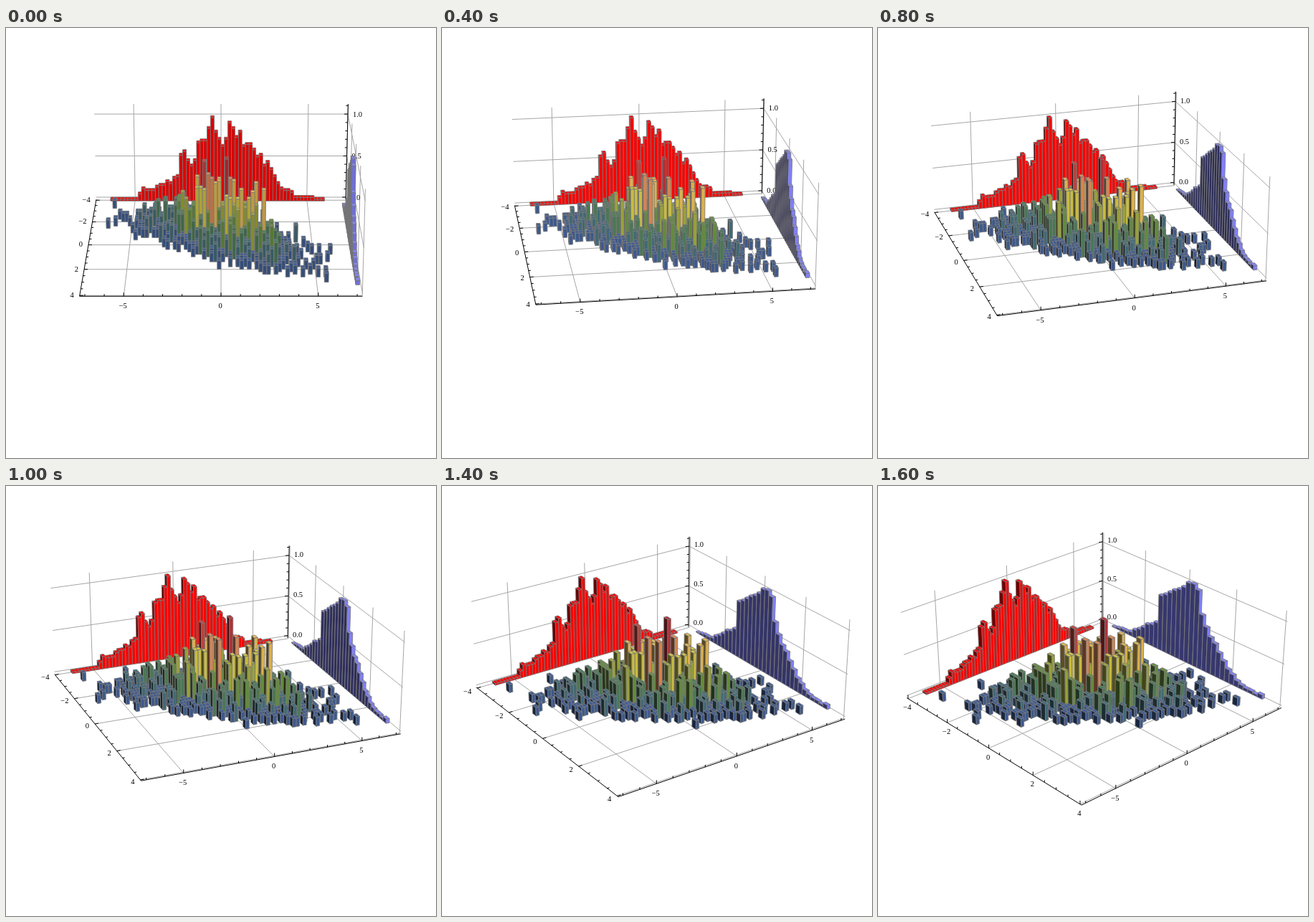
Recreate the animation shown at these times as an HTML page with a canvas. Size 600 by 600 pixels, loop 1700 ms.

```html
<!DOCTYPE html>
<html lang="en">
<head>
<meta charset="utf-8">
<title>Rotating 3D histogram</title>
<style>
html, body { margin: 0; width: 100%; height: 100%; overflow: hidden; background: #fff; }
canvas { display: block; width: 600px; height: 600px; }
</style>
</head>
<body>
<canvas id="c" width="600" height="600"></canvas>
<script>
const ctx = document.getElementById('c').getContext('2d');
const STEPS = 17, STEP_MS = 100, BIN = 0.2;
const XM = 7.27, YM = 4.06, Z0 = -0.029, Z1 = 1.119;
const RED = [255, 0, 0], BLUE = [128, 128, 255];

// Outlines of the two marginals as [position, height]
const xShape = [[-6.4, 0.015], [-4.9, 0.025], [-4.6, 0.13], [-3.9, 0.13], [-2.5, 0.28], [-2.3, 0.6],
  [-1.7, 0.46], [-0.9, 0.82], [-0.5, 1], [0.1, 0.72], [0.5, 0.85], [0.9, 0.85], [1.7, 0.63],
  [2.9, 0.38], [3.3, 0.2], [4.3, 0.06], [6.2, 0.012]];
const yShape = [[-3.3, 0.015], [-2.5, 0.05], [-1.3, 0.33], [-1.1, 0.71], [0.3, 1], [0.5, 0.95],
  [0.7, 0.7], [1.1, 0.46], [1.9, 0.16], [2.5, 0.04], [3.3, 0.012]];

// Height colours of the joint histogram, low to high
const ramp = [[60, 86, 146], [66, 108, 112], [80, 130, 62], [155, 162, 58], [222, 200, 72], [217, 140, 85], [178, 48, 54]];

function rampColor(h) {
  const p = Math.min(Math.max((h - 0.08) / 0.85, 0), 1) * (ramp.length - 1);
  const i = Math.min(Math.floor(p), ramp.length - 2);
  return ramp[i].map((a, j) => a + (ramp[i + 1][j] - a) * (p - i));
}

let seed = 20117;
function rand() {
  seed = (seed + 0x6D2B79F5) | 0;
  let r = Math.imul(seed ^ (seed >>> 15), 1 | seed);
  r = (r + Math.imul(r ^ (r >>> 7), 61 | r)) ^ r;
  return ((r ^ (r >>> 14)) >>> 0) / 4294967296;
}
const gauss = () => Math.sqrt(-2 * Math.log(1 - rand())) * Math.cos(2 * Math.PI * rand());

function heightAt(shape, p) {
  const i = Math.min(Math.max(shape.findIndex(s => s[0] >= p), 1), shape.length - 1);
  const [a, ha] = shape[i - 1], [b, hb] = shape[i];
  return ha + (hb - ha) * Math.min(Math.max((p - a) / (b - a), 0), 1);
}

// Whole counts per bin: the outline with some noise, peaking at max
function countBins(shape, from, to, max, noise) {
  const bins = [];
  for (let i = Math.round(from / BIN); i < Math.round(to / BIN); i++) {
    const mean = max * heightAt(shape, (i + 0.5) * BIN) * (1 + noise * (2 * rand() - 1));
    const n = Math.min(max, Math.round(mean + rand() - 0.5));
    if (n > 0) bins.push({ i, n, h: n / max });
  }
  return bins;
}

const xBins = countBins(xShape, -6.4, 6.2, 47, 0.11);
const yBins = countBins(yShape, -3.4, 3.4, 80, 0.04);

// Correlated cloud: y follows x, one unit of height per point
function jointBars() {
  const cells = new Map();
  const add = (i, j, h, max) => {
    const key = i + ',' + j, old = cells.get(key);
    cells.set(key, { i, j, h: Math.min((old ? old.h : 0) + h, max) });
  };
  for (const { i, n } of xBins) {
    for (let k = 0; k < n; k++) {
      const y = 0.05 + 0.37 * (i + 0.5) * BIN + 0.66 * gauss();
      add(i, Math.floor(Math.min(Math.max(y, -3.1), 2.7) / BIN), 0.1, 0.7);
    }
  }
  // Central peaks and the lone outlier
  [[1, 1, 1], [-5, -2, 0.9], [-3, 2, 0.8], [-4, 0, 0.8], [2, 2, 0.8], [27, 15, 0.1]]
    .forEach(([i, j, h]) => add(i, j, h, h));
  return [...cells.values()].map(({ i, j, h }) => ({ x: i * BIN, y: j * BIN, h, color: rampColor(h) }));
}

const redBars = xBins.map(({ i, h }) => ({ x: i * BIN, y: -3.9, h, color: RED }));
const blueBars = yBins.map(({ i, h }) => ({ x: 7, y: i * BIN, h, color: BLUE }));
const cloud = jointBars();

let cam;
function setCamera(k) {
  const t = 1.02 * k / (STEPS - 1);
  const left = 7.6 * Math.sin(t), front = 13.8 * Math.cos(t), up = 5.38;
  const r = Math.hypot(left, front), d = Math.hypot(r, up);
  cam = { x: -left * XM, ct: front / r, st: left / r, cp: r / d, sp: up / d, d };
}

function project(x, y, z) {
  const X = x / XM, Y = y / YM, Z = 0.8 * (z - Z0) / (Z1 - Z0);
  const u = X * cam.ct + Y * cam.st, v = Y * cam.ct - X * cam.st;
  const s = 185 / (1 - (v * cam.cp + Z * cam.sp) / cam.d);
  return [300 + s * u, 302.6 + s * (v * cam.sp - Z * cam.cp)];
}

function trace(pts) {
  ctx.beginPath();
  pts.forEach(p => ctx.lineTo(p[0], p[1]));
}

function line(a, b) {
  trace([a, b]);
  ctx.stroke();
}

function face(pts, color, light) {
  trace(pts.map(p => project(...p)));
  ctx.closePath();
  ctx.fillStyle = `rgb(${color.map(c => Math.min(255, Math.round(c * light)))})`;
  ctx.fill();
  ctx.stroke();
}

function drawBars(bars, light) {
  ctx.strokeStyle = '#7a7a7a';
  ctx.lineWidth = 0.85;
  const mid = b => Math.abs(b.x + BIN / 2 - cam.x);
  [...bars].sort((a, b) => a.y - b.y || mid(b) - mid(a)).forEach(({ x, y, h, color }) => {
    const x1 = x + BIN, y1 = y + BIN;
    const sx = cam.x < x ? x : cam.x > x1 ? x1 : null;
    if (sx !== null) face([[sx, y, 0], [sx, y1, 0], [sx, y1, h], [sx, y, h]], color, light.side);
    face([[x, y1, 0], [x1, y1, 0], [x1, y1, h], [x, y1, h]], color, light.front);
    face([[x, y, h], [x1, y, h], [x1, y1, h], [x, y1, h]], color, light.top);
  });
}

function drawGrid() {
  const seg = (a, b) => line(project(...a), project(...b));
  ctx.strokeStyle = '#a6a6a6';
  ctx.lineWidth = 1;
  for (const x of [-5, 0, 5]) {
    seg([x, -YM, Z0], [x, -YM, Z1]);
    seg([x, -YM, Z0], [x, YM, Z0]);
  }
  for (const y of [-4, -2, 0, 2, 4]) {
    seg([XM, y, Z0], [XM, y, Z1]);
    seg([-XM, y, Z0], [XM, y, Z0]);
  }
  for (const z of [0, 0.5, 1]) {
    seg([-XM, -YM, z], [XM, -YM, z]);
    seg([XM, -YM, z], [XM, YM, z]);
  }
}

function label(text, x, y, align) {
  ctx.textAlign = align;
  ctx.fillText(text, x, y);
}

const num = n => (n < 0 ? '\u2212' : '') + Math.abs(n);

function drawAxes(k) {
  ctx.strokeStyle = ctx.fillStyle = '#000';
  ctx.lineWidth = 1;
  ctx.font = '10.5px "Liberation Serif", serif';
  ctx.textBaseline = 'middle';
  const below = k >= 15;
  line(project(-XM, YM, Z0), project(XM, YM, Z0));
  line(project(-XM, -YM, Z0), project(-XM, YM, Z0));
  line(project(XM, -YM, Z0), project(XM, -YM, Z1));

  for (let x = -7; x <= 7; x++) {
    const [px, py] = project(x, YM, Z0), major = x % 5 === 0;
    line([px, py], [px, py - (major ? 5 : 3)]);
    if (major) label(num(x), px - 1, py + 14, 'center');
  }
  for (let i = -8; i <= 8; i++) {
    const y = i / 2, [px, py] = project(-XM, y, Z0), major = i % 4 === 0;
    const len = major ? 5 : 3;
    line([px, py], below ? [px, py - len] : [px + len, py - len * cam.st * 0.5]);
    if (!major) continue;
    if (below) label(num(y), px - 1, py + 13, 'center');
    else label(num(y), px - 8, py + 0.35 * k, 'right');
  }
  for (let i = 0; i <= 11; i++) {
    const [px, py] = project(XM, -YM, i / 10), major = i % 5 === 0;
    line([px, py], [px - (major ? 5 : 3), py + cam.st]);
    if (major) label((i / 10).toFixed(1), px + 7, py + 1 - 3 * k / 16, 'left');
  }
}

function draw(k) {
  setCamera(k);
  ctx.fillStyle = '#fff';
  ctx.fillRect(0, 0, 600, 600);
  ctx.lineJoin = 'round';
  const light = {
    front: 0.86 + 0.14 * Math.min(k / 4, 1),
    side: 0.25 + 0.18 * k / 16,
    top: 1.05
  };
  drawGrid();
  drawAxes(k);
  drawBars(redBars, light);
  drawBars(blueBars, light);
  drawBars(cloud, light);
}

const start = performance.now();
let shown = -1;
function tick() {
  const k = Math.floor((performance.now() - start) / STEP_MS) % STEPS;
  if (k !== shown) draw(shown = k);
  requestAnimationFrame(tick);
}
tick();
</script>
</body>
</html>
```
